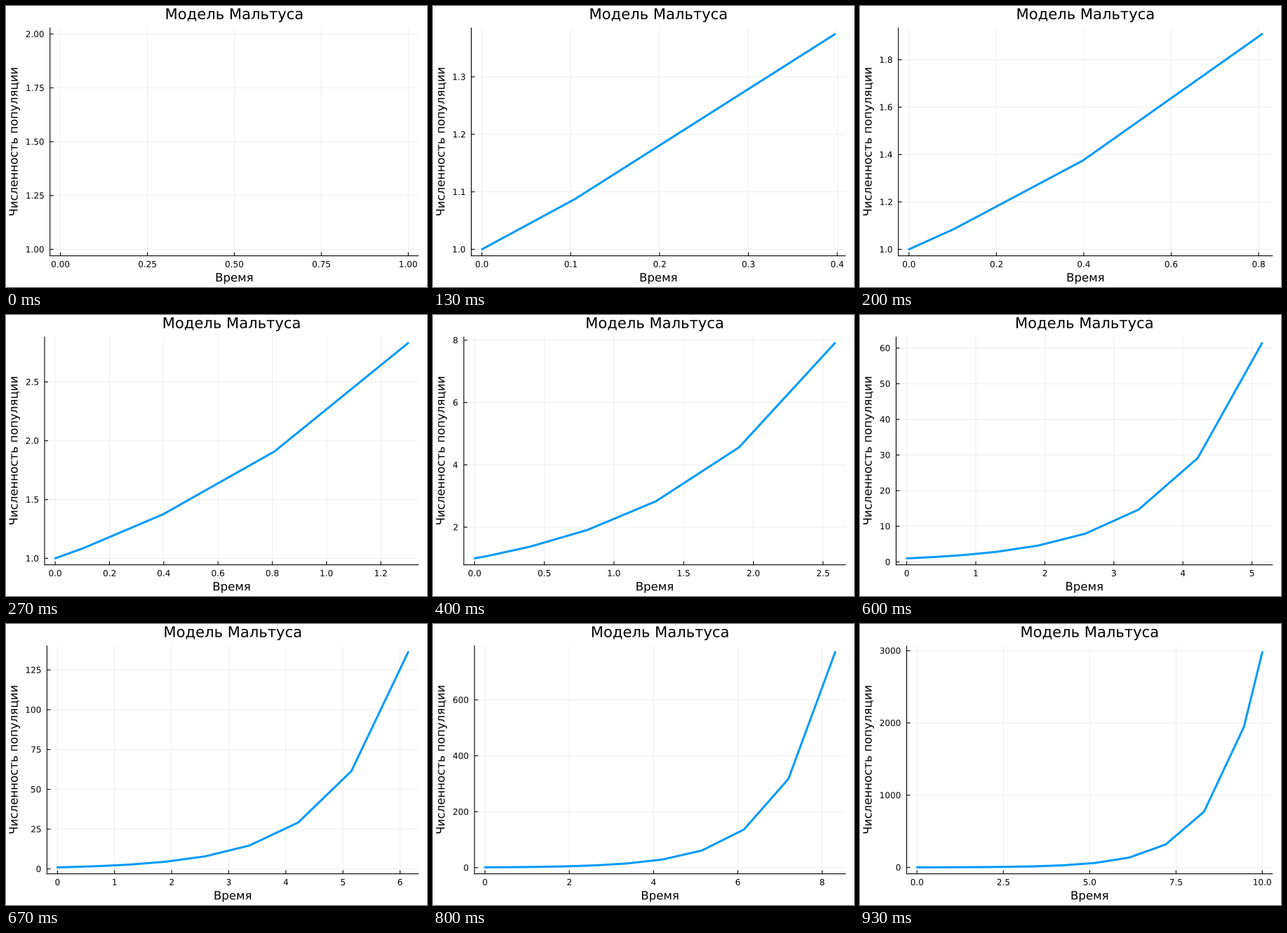
Animation, 600 px wide and 400 px high, one loop 990 ms. Source, as a matplotlib script:

```python
import numpy as np
import matplotlib.pyplot as plt
from matplotlib.animation import FuncAnimation
from matplotlib.patches import PathPatch
from matplotlib.textpath import TextPath
from matplotlib.transforms import Affine2D

W, H = 600, 400
TOP, BOTTOM, RIGHT = 30.7, 355.6, 588.2
PAD = 0.03
PX = 0.72  # points per pixel at 100 dpi
TICK_SIZE, LABEL_SIZE, TITLE_SIZE = 12.06, 16.58, 21.1

plt.rcParams.update({"font.family": "DejaVu Sans", "path.snap": False})

# Exponential growth sampled at the solver's adaptive time steps
GROWTH = 0.8
times = np.array([0, 0.1045, 0.3976, 0.808, 1.3005, 1.897, 2.585, 3.3595,
                  4.215, 5.147, 6.143, 7.2, 8.3095, 9.4665, 10])
sizes = np.exp(GROWTH * times)

X_STEPS = [0.25, 0.025, 0.1, 0.2, 0.2, 0.5, 0.5, 1, 1, 1, 1, 2, 2, 2, 2.5]
Y_STEPS = [0.25, 0.02, 0.1, 0.2, 0.5, 1, 2, 2, 5, 10, 25, 100, 200, 500, 1000]

fig = plt.figure(figsize=(W / 100, H / 100), dpi=100, facecolor="white")
ax = fig.add_axes([0, 0, 1, 1])


def padded(lo, hi):
    extra = PAD * (hi - lo)
    return lo - extra, hi + extra


def ticks(limits, step):
    """Tick values inside the limits and their labels."""
    lo, hi = limits
    values = np.arange(np.ceil(lo / step), np.floor(hi / step) + 1) * step + 0.0
    digits = next(d for d in range(4) if abs(round(step, d) - step) < 1e-9)
    return values, [f"{abs(v):.{digits}f}" for v in values]


def put_text(text, x, y, size, align="center", angle=0):
    """Place text by its ink box along the line and by its baseline across it."""
    path = TextPath((0, 0), text, size=size)
    box = path.get_extents()
    anchor = box.x1 if align == "right" else (box.x0 + box.x1) / 2
    place = (Affine2D().translate(-anchor, 0).scale(1, -1)
             .rotate_deg(-angle).translate(x, y))
    ax.add_patch(PathPatch(path, fc="black", lw=0,
                           transform=place + ax.transData))


def line(xs, ys, width=1.1, **style):
    style = {"color": "black", "solid_capstyle": "butt", **style}
    ax.plot(xs, ys, lw=width * PX, **style)


def draw_plot(k):
    ax.clear()
    ax.set_xlim(0, W)
    ax.set_ylim(H, 0)
    ax.axis("off")

    xlim = padded(0, times[k] if k else 1)
    ylim = padded(1, sizes[k] if k else 2)
    xt, xlabels = ticks(xlim, X_STEPS[k])
    yt, ylabels = ticks(ylim, Y_STEPS[k])

    # The left margin follows the widest tick label
    widest = max(TextPath((0, 0), s, size=TICK_SIZE).get_extents().width
                 for s in ylabels)
    left = 37.5 + widest

    def to_x(v):
        return left + (v - xlim[0]) / (xlim[1] - xlim[0]) * (RIGHT - left)

    def to_y(v):
        return BOTTOM - (v - ylim[0]) / (ylim[1] - ylim[0]) * (BOTTOM - TOP)

    for x in to_x(xt):
        line([x, x], [TOP, BOTTOM], 1, alpha=0.065)
    for y in to_y(yt):
        line([left, RIGHT], [y, y], 1, alpha=0.065)

    line([left, left], [TOP, BOTTOM + 0.5])
    line([left - 0.5, RIGHT], [BOTTOM, BOTTOM])
    for x, label in zip(to_x(xt), xlabels):
        line([x, x], [BOTTOM, BOTTOM - 5])
        put_text(label, x, 371.8, TICK_SIZE)
    for y, label in zip(to_y(yt), ylabels):
        line([left, left + 5], [y, y])
        put_text(label, left - 8.9, y + 4.4, TICK_SIZE, "right")

    middle = (left + RIGHT) / 2
    put_text("Модель Мальтуса", middle, 18.7, TITLE_SIZE)
    put_text("Время", middle, 392.2, LABEL_SIZE)
    put_text("Численность популяции", 16.5, (TOP + BOTTOM) / 2, LABEL_SIZE,
             angle=90)

    if k:
        line(to_x(times[:k + 1]), to_y(sizes[:k + 1]), 3, color="#009AFA",
             solid_capstyle="round", solid_joinstyle="round")


def update(n):
    # 15 pictures per second on a 10 ms clock
    draw_plot(int((n + 0.5) * 3 / 20))
    return []


anim = FuncAnimation(fig, update, frames=99, interval=10, repeat=True,
                     repeat_delay=0, blit=False)
plt.show()
```
